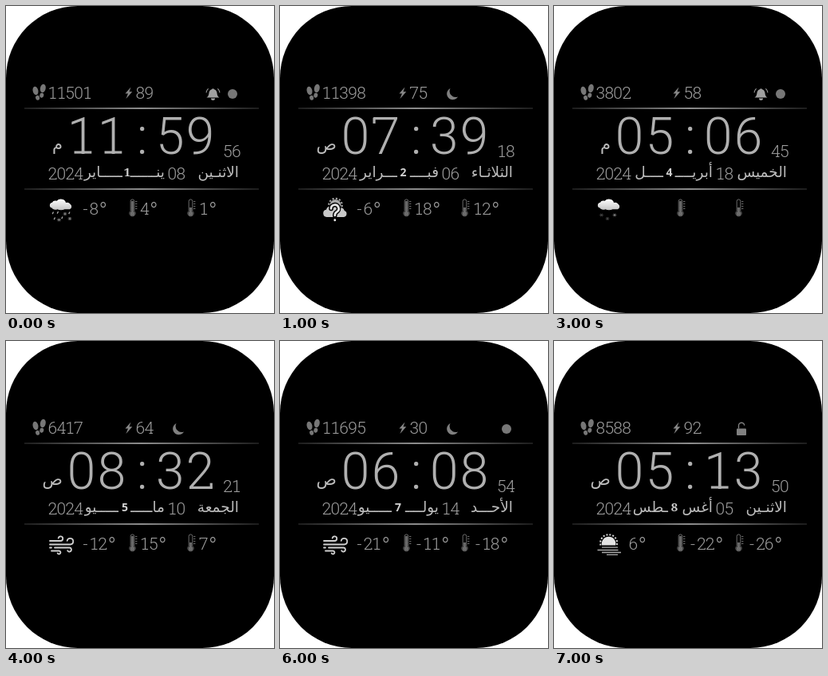
An HTML page for the animation above (8 s loop, 336 by 384 pixels).

```html
<!DOCTYPE html>
<html lang="ar">
<head>
<meta charset="utf-8">
<title>Watch face</title>
<style>
  html, body { margin: 0; width: 100%; height: 100%; overflow: hidden; background: #fff; }
  svg { display: block; }
  .num { font-family: Roboto, sans-serif; font-weight: 300; text-anchor: middle; fill: #9c9c9c; }
  .clock { fill: #b0b0b0; }
  .serif { fill: none; stroke: #9c9c9c; }
  .serif.clock { stroke: #b0b0b0; }
  .ar { font: 18.5px "DejaVu Sans", sans-serif; direction: rtl; fill: #bcbcbc; }
  .half { font-size: 21px; }
  .month { font: bold 14px "Noto Sans", sans-serif; text-anchor: middle; fill: #d0d0d0; }
  .month.old { font: 600 15px "Noto Serif", serif; }
  .state { visibility: hidden; animation: show 8s step-end infinite; }
  @keyframes show {
    0% { visibility: visible; }
    12.5%, 100% { visibility: hidden; }
  }
</style>
</head>
<body>
<svg id="face" width="336" height="384" xmlns="http://www.w3.org/2000/svg">
  <defs>
    <linearGradient id="shine">
      <stop offset="0" stop-color="#1c1c1c"/>
      <stop offset=".5" stop-color="#8c8c8c"/>
      <stop offset="1" stop-color="#1c1c1c"/>
    </linearGradient>
    <linearGradient id="puff" x2="0" y2="1">
      <stop offset="0" stop-color="#fff"/>
      <stop offset="1" stop-color="#c4c4c4"/>
    </linearGradient>

    <path id="cloud" fill="url(#puff)" d="M57.5 252.5a3.3 3.3 0 0 1 .2-6.5a5 4.300 0 0 1 6-2.200a6.200 5 0 0 1 11.300 2.200a4.600 3.600 0 0 1 5.500 1.800a3.600 3.600 0 0 1-.5 6.400h-6.500a6 3 0 0 1-9 0a4.500 3 0 0 1-7-1.700z"/>
    <path id="flake" fill="none" stroke-width=".8" d="M-2.300 0H2.300M-1.200-2L1.200 2M1.200-2L-1.200 2"/>

    <g id="bell" fill="#a0a0a0">
      <path d="M251.5 114.5c3-2 2.700-4.500 3.200-7a5 5 0 0 1 3.600-3.500a1.300 1.300 0 0 1 2.400 0a5 5 0 0 1 3.600 3.500c.5 2.500.2 5 3.200 7z"/>
      <path d="M257 115.600h5a2.500 2.500 0 0 1-5 0z"/>
      <path d="M253.600 103.400q-2.300 2-2.600 5M265.400 103.400q2.300 2 2.600 5" fill="none" stroke="#a0a0a0" stroke-width="1.100"/>
    </g>
    <path id="moon" fill="#808080" d="M213.500 103a7.400 7.400 0 1 0 9.500 10.400a7.500 7.500 0 0 1-9.500-10.400z"/>
    <g id="lock">
      <rect x="229" y="109.500" width="12" height="8.500" rx="1" fill="#808080"/>
      <path d="M231.500 109.500v-3.300a3.600 3.600 0 0 1 7.200-.6" fill="none" stroke="#808080" stroke-width="1.400"/>
    </g>
    <circle id="link" cx="284" cy="110" r="6" fill="#777"/>

    <g id="sleet">
      <use href="#cloud"/>
      <path d="M59.500 257.500l-1.300 2.600M65.500 257l-1.300 2.600M71 263.500l-1.300 2.600M80 257.500l-1.300 2.600M61.500 264.500l-1.300 2.600" stroke="#a8a8a8" stroke-width="1.300"/>
      <g stroke="#909090">
        <use href="#flake" x="74" y="260"/><use href="#flake" x="66.500" y="267.500"/><use href="#flake" x="80" y="266"/>
      </g>
    </g>
    <g id="snow">
      <use href="#cloud"/>
      <g stroke="#505050">
        <use href="#flake" x="59.500" y="261.500"/><use href="#flake" x="67" y="266"/><use href="#flake" x="76" y="261.500" stroke="#808080"/>
      </g>
    </g>
    <g id="unknown">
      <circle cx="69.500" cy="249" r="7" fill="#aaa"/>
      <circle cx="69.500" cy="249" r="8.300" fill="none" stroke="#aaa" stroke-width="2" stroke-dasharray="2.200 2.150"/>
      <path d="M58.500 264a4.700 4.700 0 0 1-.5-9.300a6 6 0 0 1 6-4.200a7 7 0 0 1 11.500 1.800a5 5 0 0 1 5.200 3.600a4.200 4.200 0 0 1-.7 8.100z" fill="#c8c8c8"/>
      <g fill="none" stroke-linecap="round">
        <path d="M64 253.500a4.800 4.800 0 1 1 7.200 4.100q-2.400 1.400-2.400 4.400M68.800 267.600v.3" stroke="#000" stroke-width="5.600"/>
        <path d="M64 253.500a4.800 4.800 0 1 1 7.200 4.100q-2.400 1.400-2.400 4.400M68.800 267.600v.3" stroke="#e8e8e8" stroke-width="2.700"/>
      </g>
    </g>
    <path id="wind" fill="none" stroke="#cfcfcf" stroke-width="1.800" stroke-linecap="round" d="M55 250h13.500a2.800 2.800 0 1 0-2.800-3.400M55 254.500h25.500a3.800 3.800 0 1 0-3.800-4.600M61 258.500h18.500a2.500 2.500 0 1 1-2.300 3.600M55 258.500h2M57 262.500h9.500a2 2 0 1 1-1.800 3"/>
    <g id="haze">
      <path d="M60 255.500a8.800 8.800 0 1 1 17.200 0z" fill="#e4e4e4"/>
      <path d="M58.500 255.500a10.500 10.500 0 1 1 20.200 0" fill="none" stroke="#d8d8d8" stroke-width="2" stroke-dasharray="2 2"/>
      <path d="M60 258.200h20M54.500 261.500h26M60 264.500h24M66 267.300h14" stroke="#aaa" stroke-width="1.300"/>
    </g>

    <g id="thermo" fill="none" stroke="#6c6c6c">
      <path d="M156.200 256.500v-12.300a2.300 2.300 0 0 1 4.600 0v12.300a3.600 3.600 0 1 1-4.600 0z"/>
      <path d="M158.500 252v7" stroke-width="2.800"/>
      <circle cx="158.500" cy="259.600" r="2.900" fill="#6c6c6c" stroke="none"/>
      <path d="M162.200 244.500h2.200M162.200 247.500h2.200M162.200 250.500h2.200M162.200 253.500h2.200"/>
    </g>
  </defs>

  <rect width="336" height="384" rx="90"/>
  <path d="M23 127h294v2H23zM23 228h294v2H23z" fill="url(#shine)"/>
  <g fill="#777">
    <ellipse cx="37" cy="106" rx="3.400" ry="5.300" transform="rotate(-14 37 106)"/>
    <ellipse cx="39.600" cy="114.800" rx="2.500" ry="3" transform="rotate(-14 39.600 114.800)"/>
    <ellipse cx="46.300" cy="103" rx="3.400" ry="5.300" transform="rotate(12 46.300 103)"/>
    <ellipse cx="44.800" cy="111.800" rx="2.500" ry="3" transform="rotate(12 44.800 111.800)"/>
    <path d="M156.500 101.500l-7 8h3.500l-2.500 6.500l7.800-8.800h-3.800z" fill="#888"/>
  </g>
  <use href="#thermo"/>
  <use href="#thermo" x="73"/>
  <path d="M158.500 244v9" stroke="#6c6c6c" stroke-width="2.800"/>
</svg>
<script>
const face = document.getElementById('face');

// Slab details in em, measured from the digit's centre on the baseline
const slabs = {
  1: 'M-.14-.026H.2',
  2: 'M.215 0V-.11',
  4: 'M.01-.026H.22',
  7: 'M-.225-.7V-.59'
};

const states = [
  { steps: '11501', power: '89', icons: ['bell', 'link'], time: '11:59', sec: '56', half: 'م',
    day: 'الاثن~ين', date: '08', month: ['ين~', 1, '~اير'], gap: [158, 146], sky: 'sleet', temps: ['-8', '4', '1'] },
  { steps: '11398', power: '75', icons: ['moon'], time: '07:39', sec: '18', half: 'ص',
    day: 'الثلاث~اء', date: '06', month: ['فب~', 2, '~راير'], gap: [162, 147], sky: 'unknown', temps: ['-6', '18', '12'] },
  { steps: '9264', power: '81', icons: ['lock', 'link'], time: '10:24', sec: '37', half: 'م',
    day: 'الأربع~اء', date: '13', month: ['مـ~', 3, '~ارس'], gap: [160, 145], sky: 'unknown', temps: ['-3', '14', '9'] },
  { steps: '3802', power: '58', icons: ['bell', 'link'], time: '05:06', sec: '45', half: 'م',
    day: 'الخم~يس', date: '18', month: ['أبري~', 4, '~ل'], gap: [152, 137], sky: 'snow', temps: [] },
  { steps: '6417', power: '64', icons: ['moon'], time: '08:32', sec: '21', half: 'ص',
    day: 'الجم~عة', date: '10', month: ['ما~', 5, '~يو'], gap: [157, 141], sky: 'wind', temps: ['-12', '15', '7'] },
  { steps: '2893', power: '75', icons: ['lock', 'link'], time: '11:15', sec: '42', half: 'م',
    day: 'السب~ت', date: '22', month: ['يون~', 6, '~يو'], gap: [156, 140], sky: 'snow', temps: ['-17', '17', '8'] },
  { steps: '11695', power: '30', icons: ['moon', 'link'], time: '06:08', sec: '54', half: 'ص',
    day: 'الأح~د', date: '14', month: ['يول~', 7, '~يو'], gap: [156, 140], sky: 'wind', temps: ['-21', '-11', '-18'] },
  { steps: '8588', power: '92', icons: ['lock'], time: '05:13', sec: '50', half: 'ص',
    day: 'الاثن~ين', date: '05', month: ['أغس~', 8, '~طس'], gap: [159, 143], sky: 'haze', temps: ['6', '-22', '-26'] }
];

function add(parent, tag, attrs, text = '') {
  const el = document.createElementNS(face.namespaceURI, tag);
  for (const key in attrs) el.setAttribute(key, attrs[key]);
  el.textContent = text;
  return parent.appendChild(el);
}

function digits(g, text, xs, y, size, cls = '') {
  add(g, 'text', { class: 'num ' + cls, x: xs.join(' '), y, 'font-size': size }, text);
  xs.forEach((x, i) => {
    const d = slabs[text[i]];
    if (d) add(g, 'path', { class: 'serif ' + cls, d, 'stroke-width': .05,
      transform: `translate(${x} ${y}) scale(${size})` });
  });
}

function number(g, text, x, y) {
  digits(g, text, [...text].map((_, i) => x + 5.4 + i * 10.9), y, 21);
}

function temperature(g, value, x) {
  number(g, value, x, 261);
  add(g, 'text', { class: 'num', x: x + value.length * 10.9 + 6, y: 266, 'font-size': 28 }, '°');
}

// Lengthens the word at "~" with kashidas until it spans left..right
function arabic(g, word, right, left) {
  const el = add(g, 'text', { class: 'ar', x: right, y: 214 });
  for (let n = 0; n < 20; n++) {
    el.textContent = word.replace('~', 'ـ'.repeat(n));
    if (el.getComputedTextLength() > right - left - 3) break;
  }
}

states.forEach((s, i) => {
  const g = add(face, 'g', { class: 'state', style: `animation-delay:${i - states.length}s` });
  number(g, s.steps, 53, 116);
  number(g, s.power, 163, 116);
  for (const id of [...s.icons, s.sky]) add(g, 'use', { href: '#' + id });

  digits(g, s.time, [94.5, 132.5, 170.8, 205.8, 243.5], 184.7, 64, 'clock');
  number(g, s.sec, 272.5, 189);
  add(g, 'text', { class: 'ar half', x: 71, y: 180 }, s.half);

  arabic(g, s.day, 292, 238);
  number(g, s.date, 203, 217);
  const [head, index, tail] = s.month, [right, left] = s.gap;
  arabic(g, head, 199, right);
  add(g, 'text', { class: 'month' + ([1, 6, 8].includes(index) ? ' old' : ''), x: (left + right) / 2, y: 213 }, index);
  arabic(g, tail, left, 100);
  number(g, '2024', 53, 217);

  s.temps.forEach((t, k) => temperature(g, t, [94, 168.5, 242.5][k]));
});
</script>
</body>
</html>
```
